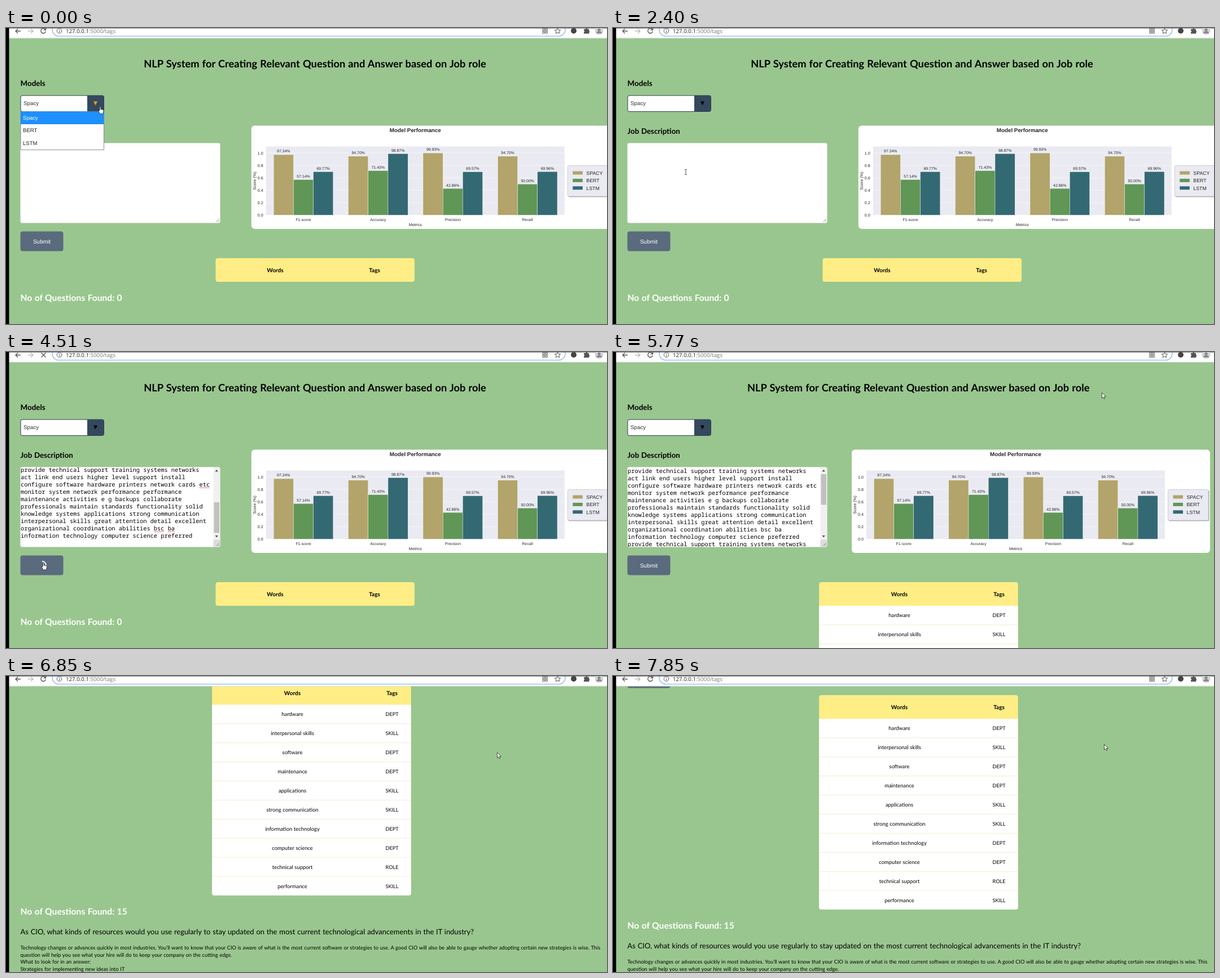
Animation of 1065 by 526 pixels, one loop 8000 ms. Source, as an HTML page:

```html
<!DOCTYPE html>
<html lang="en">
<head>
<meta charset="utf-8">
<title>NLP question tool</title>
<style>
html, body { margin: 0; width: 100%; height: 100%; overflow: hidden; background: #99c68e; }
svg { display: block; text-rendering: geometricPrecision; }
.c { font-family: Lato, sans-serif; word-spacing: .04em; }
.a { font-family: "Liberation Sans", Arial, sans-serif; }
.u { font-family: "Open Sans", sans-serif; }
.m { font-family: "Noto Sans Mono", monospace; font-weight: 500; }
.b { font-weight: 700; }
.mid { text-anchor: middle; }
.end { text-anchor: end; }
</style>
</head>
<body>
<svg id="stage" width="1065" height="526" viewBox="0 0 1065 526"></svg>
<script>
const LOOP = 8000, LOADED = 5080;

const text = (x, y, size, cls, str, fill = '#000', extra = '') =>
  `<text x="${x}" y="${y}" font-size="${size}" class="${cls}" fill="${fill}" ${extra}>${str}</text>`;
const rect = (x, y, w, h, fill, extra = '') =>
  `<rect x="${x}" y="${y}" width="${w}" height="${h}" fill="${fill}" ${extra}/>`;
const line = (d, stroke, width = 1) =>
  `<path d="${d}" fill="none" stroke="${stroke}" stroke-width="${width}"/>`;
const shape = (d, fill, extra = '') => `<path d="${d}" fill="${fill}" ${extra}/>`;
const group = (id, body, extra = '') => `<g id="${id}" ${extra}>${body}</g>`;

const models = [['SPACY', '#b2a46a'], ['BERT', '#609656'], ['LSTM', '#336973']];
const metrics = [
  ['F1-score', 97.24, 57.14, 69.77],
  ['Accuracy', 94.70, 71.43, 98.87],
  ['Precision', 99.93, 42.86, 69.57],
  ['Recall', 94.70, 50.00, 69.96]
];

function chart() {
  const ink = '#262626', zero = 332.5, unit = 110.5, bar = 35.2;
  let s = rect(423, 173.5, 635, 183.5, '#fff', 'rx="6"') +
    text(713.5, 184.8, 9.8, 'a b mid', 'Model Performance', ink) +
    rect(449, 210.5, 529, 122, '#eaeaf2');
  for (let i = 0; i <= 5; i++) {
    const y = zero - unit * i / 5;
    s += line(`M449 ${y}H978`, '#fff', .5) + text(444, y + 2.6, 7.2, 'a end', (i / 5).toFixed(1), ink);
  }
  metrics.forEach(([name, ...scores], g) => {
    const x = 462.4 + 132.4 * g;
    scores.forEach((v, i) => {
      const h = unit * v / 100, left = x + bar * i;
      s += rect(left, zero - h, bar, h, models[i][1], 'stroke="#fff" stroke-width=".4"') +
        text(left + bar / 2, zero - h - 3.6, 6.9, 'a mid', v.toFixed(2) + '%', ink);
    });
    s += text(x + bar * 1.5, 343, 6.9, 'a mid', name, ink);
  });
  s += text(713.5, 352, 7.2, 'a mid', 'Metrics', ink) +
    text(0, 0, 7.3, 'a mid', 'Score (%)', ink, 'transform="translate(430.8 271.5) rotate(-90)"') +
    rect(984.5, 245.5, 72, 55, '#a9a9b0', 'rx="2"') +
    rect(983.5, 244.5, 71.5, 54.5, '#eaeaf2', 'rx="2" stroke="#c4c4cc" stroke-width=".8"');
  models.forEach(([name, color], i) => {
    const y = 257.5 + 13.4 * i;
    s += rect(992.5, y - 3, 17.5, 6, color) + text(1016.5, y + 3.2, 8.8, 'a', name, ink);
  });
  return s;
}

const tags = [
  ['hardware', 'DEPT'], ['interpersonal skills', 'SKILL'], ['software', 'DEPT'],
  ['maintenance', 'DEPT'], ['applications', 'SKILL'], ['strong communication', 'SKILL'],
  ['information technology', 'DEPT'], ['computer science', 'DEPT'],
  ['technical support', 'ROLE'], ['performance', 'SKILL']
];

function table(x, wordX, tagX, rows) {
  const width = 352.5, pitch = 33.9;
  let s = rect(x, 409, width, 42 + pitch * rows.length, '#ffed86', 'rx="4"') +
    text(wordX, 434.2, 10, 'c b mid', 'Words') + text(tagX, 434.2, 10, 'c b mid', 'Tags');
  rows.forEach(([word, tag], i) => {
    const y = 451 + pitch * i, last = i === rows.length - 1;
    s += (last ? rect(x, y + 10, width, pitch - 10, '#fff', 'rx="4"') : '') +
      rect(x, y, width, last ? pitch - 5 : pitch, '#fff') +
      (i ? line(`M${x} ${y}h${width}`, '#f1efd6') : '') +
      text(wordX, y + 20.4, 9.4, 'c mid', word) + text(tagX, y + 20.4, 9.1, 'c mid', tag);
  });
  return s;
}

const found = n => text(25.5, n ? 824 : 485, 15.6, 'c b', 'No of Questions Found: ' + n, '#fff');

const questions = [
  [859, 'As CIO, what kinds of resources would you use regularly to stay updated on the most current technological advancements in the IT industry?', [
    'Technology changes or advances quickly in most industries. You’ll want to know that your CIO is aware of what is the most current software or strategies to use. A good CIO will also be able to gauge whether adopting certain new strategies is wise. This',
    'question will help you see what your hire will do to keep your company on the cutting edge.',
    'What to look for in an answer:',
    'Strategies for implementing new ideas into IT',
    'Ability to stay on current IT trends',
    'Willingness to learn new IT software',
    '',
    'Example:',
    '“I understand how fast the world of technology can change. I keep on top of the latest news in IT using several professional publications.”'
  ]],
  [1016.5, 'Your team is underperforming and demotivated. How would you alter your leadership style to meet the deadlines and project goals?', [
    'CIOs must be able to lead a team of IT professionals to reach business goals. An employer can use this question to separate applicants with strong leadership skills from the rest. An ideal chief information officer candidate would articulate a viable',
    'strategy for adapting their leadership approach to suit the situation.',
    'A candidate\'s answer should emphasize:',
    'Problem-solving, management, leadership and strategy skills',
    'Ability to connect with team members even during a challenging situation',
    'Confidence in leadership ability',
    'An example answer to this question could look like this:',
    '',
    'Example:',
    '"Firstly, I would review my team needs and my current leadership style and identify weaknesses in my approach. In my experience, lack of motivation is usually due to a disconnect between leadership strategy and team characteristics. I would use a',
    'strategy of situational leadership to modify my style to the experience, personality and maturity of my team members. Once I make the change, I would monitor its effect on motivation and productivity, making further changes if necessary."'
  ]],
  [1199, 'As a maintenance manager, how would you resolve an issue between two of your employees?', []]
];

const answers = questions.map(([y, title, body]) =>
  text(25.5, y, 12.93, 'c', title) +
  body.map((s, i) => text(25.5, y + 27.4 + 12.45 * i, 9.24, 'c', s)).join('')).join('');

const job = [
  'provide technical support training systems networks',
  'act link end users higher level support install',
  'configure software hardware printers network cards etc',
  'monitor system network performance performance',
  'maintenance activities e g backups collaborate',
  'professionals maintain standards functionality solid',
  'knowledge systems applications strong communication',
  'interpersonal skills great attention detail excellent',
  'organizational coordination abilities bsc ba',
  'information technology computer science preferred'
];
const jobText = (lines, y) => lines.map((s, i) => text(26, y + 13 * i, 10.35, 'm', s)).join('');
// wavy line below a word: row, first letter, letters
const squiggle = ([row, from, n]) =>
  line(`M${26 + from * 6.21} ${216 + 13 * row}` + 'l1.5 -1.5l1.5 1.5'.repeat(Math.round(n * 2.07)), '#e33', .8);

const scrollbar = rect(367.5, 205, 11.5, 128.5, '#f1f1f1') +
  rect(367.5, 333.5, 11.5, 12.5, '#dcdcdc') +
  shape('M370.5 212.5l2.7-3.5 2.7 3.5zM370.5 326l2.7 3.5 2.7-3.5z', '#505050') +
  rect(368.5, 217, 9.5, 54.5, '#c1c1c1', 'id="thumb"');

const page =
  text(547.5, 70, 18.25, 'c b mid', 'NLP System for Creating Relevant Question and Answer based on Job role', '#000', 'id="title"') +
  text(25.5, 103, 13.4, 'c b', 'Models') +
  text(25.5, 187.7, 13.3, 'c b', 'Job Description') +
  rect(26, 120, 147.5, 28.5, '#fff', 'rx="3"') +
  shape('M144 120h26.5a3 3 0 0 1 3 3v22.5a3 3 0 0 1-3 3H144z', '#34495e') +
  rect(26, 120, 147.5, 28.5, 'none', 'rx="3" stroke="#2c3e50"') +
  shape('M155 130.5h7l-3.5 7z', '#000', 'id="triangle"') +
  text(31, 137.3, 9.8, 'a', 'Spacy', '#333') +
  rect(25.5, 204.5, 354, 142, '#fff', 'rx="3" stroke="#d5e2d0" stroke-width=".7"') +
  group('caret', rect(26, 205, 1, 13, '#000')) +
  group('filled',
    group('jobEnd', jobText(job, 213) + group('spell', [[2, 51, 3], [8, 38, 3], [8, 42, 2]].map(squiggle).join(''))) +
    group('jobTop', jobText([...job, job[0]], 215)) + scrollbar, 'clip-path="url(#box)"') +
  line('M372.5 344.5l5.5-5.5M375.5 344.5l2.5-2.5', '#777', .8) +
  rect(25.5, 361.5, 76, 35, '#5a6b7e', 'rx="4"') +
  group('submit', text(63.5, 382.5, 10, 'a mid', 'Submit', '#fff')) +
  group('spinner', line('M64 372a7 7 0 0 1 7 7', '#fff', 1.8)) +
  group('chart', chart()) +
  group('before', table(371.5, 477, 653, []) + found(0)) +
  group('after', table(365.2, 507.5, 684, tags) + found(15) + answers) +
  group('menu', rect(26, 148.5, 147.5, 68, '#fff', 'stroke="#777" stroke-width=".8"') +
    rect(26, 148.5, 147.5, 22.5, '#1e90ff', 'id="mark"') +
    ['Spacy', 'BERT', 'LSTM'].map((s, i) => text(30, 162.8 + 22.5 * i, 9.6, 'a', s, '#222', 'data-option')).join(''));

const toolbar =
  rect(0, 0, 1065, 18, '#fff') + rect(0, 17.5, 1065, 1, '#d8ddd6') +
  rect(82, -9, 909, 23.5, '#fff', 'rx="11.7" stroke="#9cc0ee" stroke-width="1.6"') +
  rect(0, 0, 1065, .8, '#666') +
  line('M26 5.5H17M21 1.5l-4 4 4 4', '#555', 1.3) +
  line('M39 5.5h9M44 1.5l4 4-4 4', '#bbb', 1.3) +
  group('reload', line('M69.5 2.5A4.3 4.3 0 1 0 70.3 6M70.5 0v3.5h-3.5', '#555', 1.4)) +
  group('stop', line('M62.5 1.5l8 8M70.5 1.5l-8 8', '#555', 1.3)) +
  '<circle cx="94.5" cy="5" r="4.3" fill="none" stroke="#555"/>' + line('M94.5 4.5v3M94.5 2.3v1.2', '#555') +
  text(106, 9, 9.7, 'u', '127.0.0.1<tspan fill="#777">:5000/tags</tspan>', '#222') +
  [[951, 1], [956, 1], [951, 6], [956, 6]].map(([x, y]) => rect(x, y, 3.2, 3.2, 'none', 'stroke="#555"')).join('') +
  line('M977.5 0l1.4 3.5 3.8.3-2.9 2.4.9 3.6-3.2-2-3.2 2 .9-3.6-2.9-2.4 3.8-.3z', '#555') +
  '<circle cx="1006" cy="5" r="5" fill="#444"/>' +
  shape('M1024 2h3a1.7 1.7 0 0 1 3.4 0h2.6v3a1.7 1.7 0 0 1 0 3.3V10h-9V7.5a1.6 1.6 0 0 0 0-3z', '#555') +
  '<circle cx="1051" cy="4.5" r="7.5" fill="#d3d3d6"/><circle cx="1051" cy="3" r="2.6" fill="#85858c"/>' +
  shape('M1046 9.5a5 4 0 0 1 10 0z', '#85858c');

const outline = 'stroke="#222" stroke-width=".8"';
const arrow = shape('M0 0v9.5l2.3-2 1.5 3.3 1.6-.7-1.5-3.2h3z', '#fff', outline);
const cursors =
  group('arrow', arrow) +
  group('busy', arrow + '<circle cx="16" cy="11" r="6" fill="none" stroke="#3a8edb" stroke-width="2"/>') +
  group('hand', shape('M-1 6.5V.8a1 1 0 0 1 2 0v3.7l4 .8q1 .3 1 1.4l-.6 3.3-1 2.5H-.5L-2.8 8.3q-.8-1.5.6-1.4z', '#fff', outline)) +
  group('beam', line('M-1.8-4.5H1.8M-1.8 4.5H1.8M0-4.5v9', '#444', .9));

const $ = id => document.getElementById(id);
$('stage').innerHTML = '<clipPath id="box"><rect x="25" y="205" width="354" height="141"/></clipPath>' +
  rect(0, 0, 1065, 526, '#99c68e') + group('page', page) + toolbar +
  rect(0, 0, 5.5, 526, '#000') + cursors;

// time, cursor, x, y
const pointer = [
  [0, 'hand', 167, 140], [160, 'arrow', 150, 152], [290, 'arrow', 128, 163], [410, 'arrow', 112, 178],
  [540, 'arrow', 102, 192], [660, 'arrow', 96, 206], [790, 'arrow', 93, 213], [920, 'arrow', 94, 198],
  [1040, 'arrow', 96, 180], [1170, 'arrow', 98, 162], [1500, 'arrow', 108, 190], [1690, 'beam', 119, 225],
  [1870, 'beam', 129, 256], [3420, 'beam', 122, 272], [3560, 'beam', 106, 306], [3710, 'arrow', 86, 348],
  [3850, 'hand', 70, 368], [3990, 'hand', 66.5, 374.5], [LOADED, 'none', 0, 0],
  [5340, 'busy', 1039.5, 121.5], [5490, 'none', 0, 0], [5770, 'arrow', 866.5, 72.5],
  [6700, 'arrow', 870.5, 136], [7010, 'arrow', 872.5, 157.5], [7700, 'arrow', 871.5, 138],
  [7850, 'arrow', 870.5, 121.5]
];
const scroll = [[0, 0], [6700, 105], [6850, 400], [7010, 640], [7400, 691], [7560, 586], [7700, 480], [7850, 375]];
const latest = (steps, t) => steps.findLast(s => s[0] <= t);

const show = (id, on) => $(id).style.display = on ? '' : 'none';
const move = (id, x, y) => $(id).setAttribute('transform', `translate(${x} ${y})`);

function render(t) {
  const loaded = t >= LOADED, loading = t >= 4360 && !loaded;
  const [, cursor, x, y] = latest(pointer, t);

  for (const id of ['arrow', 'busy', 'hand', 'beam']) {
    show(id, id === cursor);
    move(id, x, y);
  }
  move('page', 0, -latest(scroll, t)[1]);

  const picked = Math.max(0, Math.min(2, Math.floor((y - 148.5) / 22.5)));
  show('menu', t < 1320);
  $('mark').setAttribute('y', 148.5 + 22.5 * picked);
  document.querySelectorAll('[data-option]').forEach((o, i) => o.setAttribute('fill', i === picked ? '#fff' : '#222'));
  $('triangle').setAttribute('fill', t < 160 ? '#f39c12' : '#000');

  show('caret', t >= 1870 && t < 2400);
  show('filled', t >= 2800);
  show('jobEnd', !loaded);
  show('jobTop', loaded);
  show('spell', t >= 3420);
  $('thumb').setAttribute('y', loaded ? 217 : 267);

  show('submit', !loading);
  show('spinner', loading);
  $('spinner').setAttribute('transform', `rotate(${Math.floor((t - 4510) / 150) * 54} 64 379)`);
  show('stop', loading);
  show('reload', !loading);

  show('before', !loaded);
  show('after', loaded);
  move('title', loaded ? -6.3 : 0, 0);
  move('chart', loaded ? 0 : 11.8, 0);
}

const start = performance.now();
function tick() {
  render((performance.now() - start) % LOOP);
  requestAnimationFrame(tick);
}
tick();
</script>
</body>
</html>
```
